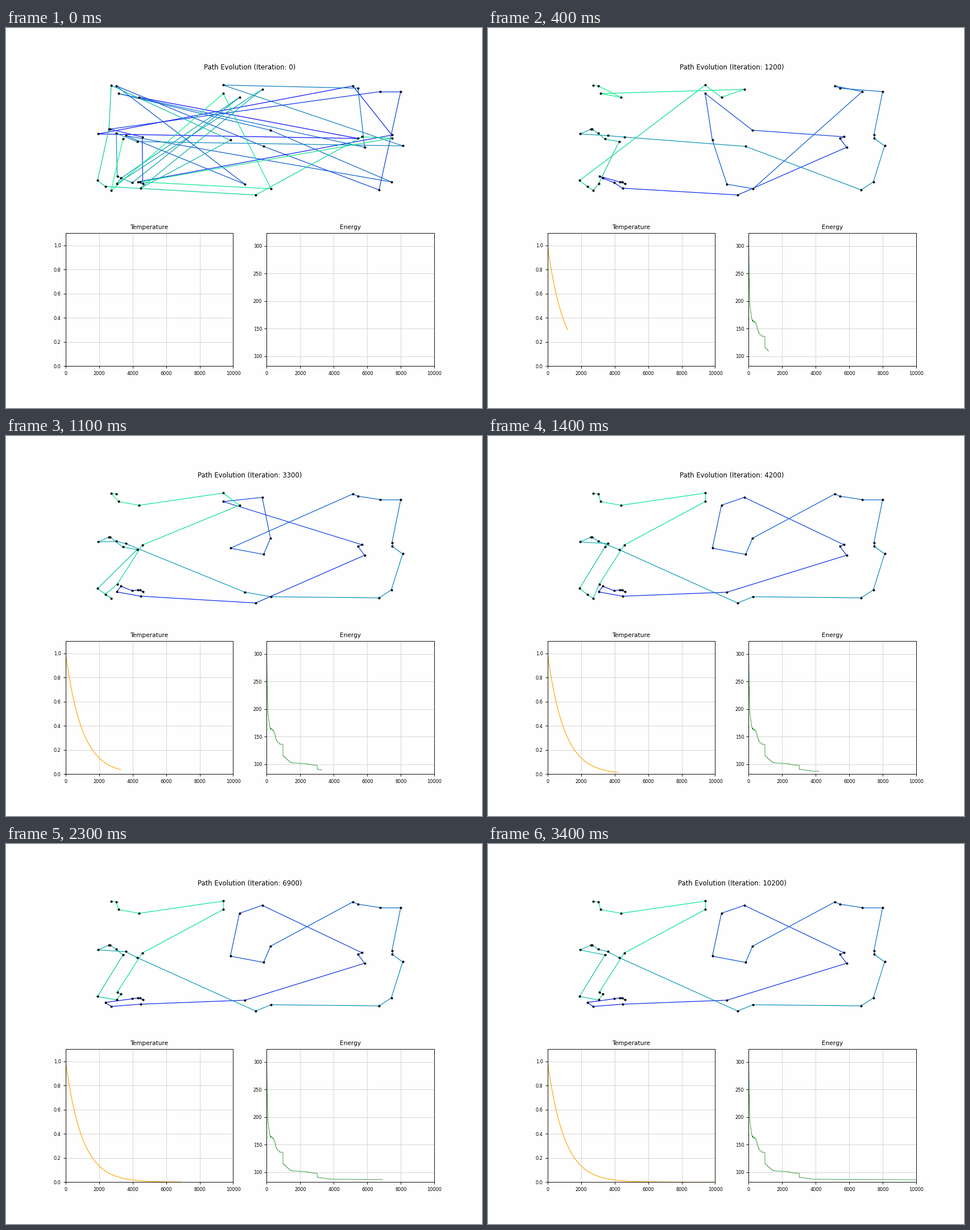
A matplotlib script for the animation above (3.5 s loop, 837 px wide and 669 px high).

```python
import numpy as np
import matplotlib.pyplot as plt
from matplotlib.animation import FuncAnimation
from matplotlib.collections import LineCollection

W, H, DPI = 837, 669, 84
FRAMES, INTERVAL, STEP = 35, 100, 300
LAST = FRAMES * STEP
BG = "#fefefe"

plt.rcParams.update({
    "font.family": "DejaVu Sans", "axes.titlesize": 9,
    "xtick.labelsize": 7, "ytick.labelsize": 7,
    "grid.color": "lightgray", "axes.facecolor": BG, "figure.facecolor": BG})

# City positions in stage pixels, one letter each
CITIES = dict(
    a=(185, 101), b=(194, 102), c=(198, 115.5), d=(234, 122),
    e=(162, 186.5), f=(181, 178), g=(194, 185.5), h=(205.5, 195.5),
    i=(210.5, 189.5), j=(230.5, 200), k=(239.5, 192),
    l=(161, 268.5), m=(174.5, 279), n=(185, 286), o=(194.5, 274.5),
    p=(195.5, 261), q=(202, 264.5), r=(222, 272.5), s=(231.5, 271),
    t=(240.5, 274.5), u=(236.5, 282),
    v=(382, 100.5), w=(382, 115.5), x=(410.5, 122), y=(450.5, 108),
    z=(394.5, 197.5), A=(453, 208.5), B=(465, 180),
    C=(420, 275), D=(439, 294), E=(466, 283),
    F=(610, 102), G=(619, 106), H=(658, 112), I=(694, 112),
    J=(678.5, 188.5), L=(697.5, 207.5), M=(677.5, 271), N=(656, 285),
    O=(619, 194.5), P=(626, 191.5), Q=(630.5, 210))

# Close neighbours: name -> (beside, dx, dy)
for name, (beside, dx, dy) in dict(R=("f", 2, 0), S=("s", 4, 0),
                                   K=("J", 0, 5.5)).items():
    CITIES[name] = tuple(np.add(CITIES[beside], (dx, dy)))

# Visiting orders, then the local moves that improve the last one
TOURS = [
    (0, "dOeFJstkRHINAbCiMBcQGvLjgprxqoyuzaflmDPKSEwnh"),
    (300, "QzgikoldcvHIpqENAFGKOPLMDCurmSsefhjBntxwyJRba"),
    (900, "tSspqruDQOPBwzCEHFGIJKLMNAkiefRghjonmlvxycdba"),
    (3000, "tSsrqouDQOPwyBAzFGHIJKLMNECigefRhjlnmpkxvdcab"),
]
MOVES = [
    (3900, "uDQOPwyBAz", "uCQOPyxzAB"),
    (3900, "ECigefRhjlnmpkxvdcab", "EDjgRfeihlmnpkwvdcba"),
    (6300, "rqou", "rmnu"),
    (6300, "gRfeihlmnp", "iefRghloqp"),
    (8700, "iefRgh", "igRfeh"),
]
for start, old, new in MOVES:
    TOURS.append((start, TOURS[-1][1].replace(old, new)))


def anneal_curves():
    """Cooling is exponential; energy falls in steps at accepted moves."""
    rng = np.random.default_rng(4)
    accepted = np.sort(LAST * rng.random(260) ** 3)
    accepted[0] = 0
    trend = np.interp(
        accepted,
        [0, 25, 70, 190, 420, 560, 680, 850, 860, 1450, 2200, 2940, 2950,
         3800, LAST],
        [308, 245, 190, 166, 160, 145, 137, 136, 118, 102.5, 101.5, 97.5, 91,
         87.5, 86.3])
    level = trend + rng.normal(0, 1.5, accepted.size) * np.exp(-accepted / 400)
    its = np.arange(0, LAST, 5)
    held = level[np.searchsorted(accepted, its, side="right") - 1]
    return its, np.exp(-its / 1000), held


its, temps, energy = anneal_curves()

# The tiny margin keeps the canvas from rounding down a pixel
fig = plt.figure(figsize=(W / DPI + 1e-9, H / DPI + 1e-9), dpi=DPI)
grid = fig.add_gridspec(2, 2)


def make_chart(cell, title, ylim, color, lw):
    ax = fig.add_subplot(cell)
    ax.set_title(title)
    ax.set_xlim(0, 10000)
    ax.set_ylim(*ylim)
    ax.grid(True)
    return ax.plot([], [], color=color, lw=lw)[0]


path_ax = fig.add_subplot(grid[0, :])
box = path_ax.bbox
path_ax.set_xlim(box.x0, box.x1)
path_ax.set_ylim(H - box.y0, H - box.y1)
path_ax.axis("off")
title = path_ax.set_title("", fontsize=10)

n_legs = len(CITIES) - 1
legs = LineCollection([], colors=plt.cm.winter(np.arange(n_legs) / n_legs),
                      linewidths=1)
path_ax.add_collection(legs, autolim=False)
path_ax.plot(*zip(*CITIES.values()), "ko", ms=2.5, zorder=3)

temp_line = make_chart(grid[1, 0], "Temperature", (0, 1.1), "orange", 1)
energy_line = make_chart(grid[1, 1], "Energy", (82, 323.4), "green", 0.6)


def update(frame):
    it = frame * STEP
    tour = [order for start, order in TOURS if start <= it][-1]
    pts = np.array([CITIES[name] for name in tour])
    legs.set_segments(np.stack([pts[:-1], pts[1:]], axis=1))
    title.set_text(f"Path Evolution (Iteration: {it})")
    seen = slice(0, np.searchsorted(its, it))
    temp_line.set_data(its[seen], temps[seen])
    energy_line.set_data(its[seen], energy[seen])
    return legs, title, temp_line, energy_line


anim = FuncAnimation(fig, update, frames=FRAMES, interval=INTERVAL,
                     init_func=lambda: update(0), repeat=True,
                     repeat_delay=0, blit=False)
plt.show()
```
